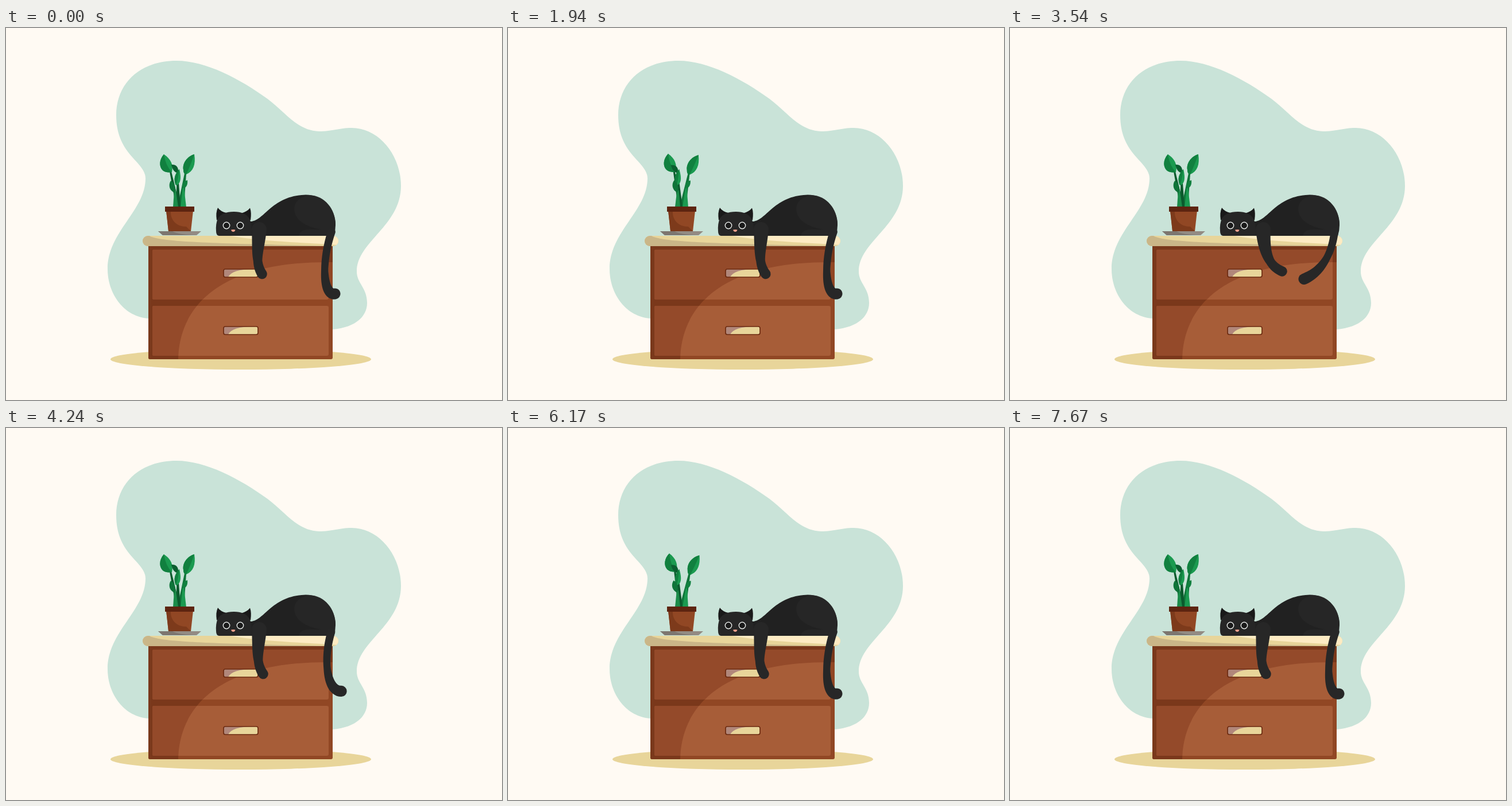
An HTML page that plays this animation: 864x648 px, repeating every 8 s.

```html
<!DOCTYPE html>
<html lang="en">
<head>
<meta charset="utf-8">
<title>Cat on a dresser</title>
<style>
  html, body { margin: 0; height: 100%; overflow: hidden; background: #fffaf3; }
  svg { display: block; width: 100%; height: 100%; }
</style>
</head>
<body>
<svg viewBox="0 0 864 648">
  <defs>
    <clipPath id="board"><rect x="238" y="362" width="341" height="18" rx="9"/></clipPath>
    <clipPath id="drawers">
      <rect x="255" y="386" width="307" height="87" rx="3"/>
      <rect x="255" y="484" width="307" height="87" rx="3"/>
    </clipPath>
    <path id="shade" d="M248 378H569V408C380 405 302 480 300 577H251Q248 577 248 574Z"/>
    <g id="handle">
      <rect x="379" y="420" width="60" height="14" rx="3" fill="#e8d59a"/>
      <path d="M379 420H436Q394 419 387 434H379Z" fill="#b1877b"/>
      <rect x="379" y="420" width="60" height="14" rx="3" fill="none" stroke="#6c2b11" stroke-width="1.7"/>
    </g>
  </defs>

  <path fill="#c9e3d8" d="M297 57C348 57 408 89 455 123C489 149 507 178 545 180C570 180 580 174 602 174C650 174 688 222 688 275C688 345 611 372 611 424C611 445 629 452 629 479C629 505 605 522 569 525L250 506C205 504 177 462 177 420C177 355 243 318 243 262C243 232 192 222 192 152C192 95 235 57 297 57Z"/>
  <ellipse cx="409" cy="577" rx="227" ry="18" fill="#e8d59a"/>

  <!-- dresser -->
  <rect x="248" y="374" width="321" height="203" rx="3" fill="#914724"/>
  <use href="#shade" fill="#7a381b"/>
  <g clip-path="url(#drawers)">
    <rect x="248" y="380" width="321" height="197" fill="#a75d38"/>
    <use href="#shade" fill="#944a2a"/>
  </g>
  <use href="#handle"/>
  <use href="#handle" y="100"/>
  <g clip-path="url(#board)">
    <rect x="238" y="362" width="341" height="18" fill="#e8d59a"/>
    <path d="M238 362H250C265 374 400 376 575 380H238Z" fill="#cab688"/>
    <path d="M390 362H579V378C520 374 450 372 390 362Z" fill="#fdebc3"/>
  </g>

  <!-- plant -->
  <g id="leftLeaf">
    <path d="M296 311L285 250L288 250L303 311Z" fill="#0b5a2d"/>
    <path d="M275 220C267 229 266 241 273 248C278 252 284 252 289 251C292 238 287 228 275 220Z" fill="#1b9a50"/>
    <path d="M275 220C267 229 266 241 273 248C278 252 284 252 289 251Q278 240 275 220Z" fill="#11803f"/>
  </g>
  <g id="rightLeaf">
    <path d="M299 311L311 253L314 254L310 311Z" fill="#0f7439"/>
    <path d="M328 220C315 224 307 236 309 247C309 252 311 255 314 255C326 250 331 238 328 220Z" fill="#1b9a50"/>
    <path d="M328 220C315 224 307 236 309 247C309 252 311 255 314 255Q321 240 328 220Z" fill="#11803f"/>
  </g>
  <g id="centreLeaf">
    <path d="M288 238C290 248 295 253 300 252C301 243 297 237 288 238Z" fill="#0b5f30"/>
    <path d="M296 311L298 250L301 270L304 311Z" fill="#0b5a2d"/>
    <path d="M302 246C294 254 291 264 296 274C304 272 306 262 302 246Z" fill="#1b9a50"/>
    <path d="M302 246C294 254 291 264 296 274Q300 262 302 246Z" fill="#11803f"/>
  </g>
  <g id="smallLeft">
    <path d="M291 312L293 283L296 283L300 312Z" fill="#1b8c49"/>
    <path d="M287 266C282 274 285 284 294 287C297 278 293 269 287 266Z" fill="#0f7439"/>
  </g>
  <g id="smallRight">
    <path d="M304 312L308 276L310 278L314 312Z" fill="#1b9a50"/>
    <path d="M316 265C309 267 306 272 308 279C314 279 317 273 316 265Z" fill="#11803f"/>
  </g>
  <path d="M279 318H326L322 354H283Z" fill="#914724"/>
  <path d="M279 318H287C286 334 296 346 314 346L322 354H283Z" fill="#7d3a1b"/>
  <rect x="277" y="311" width="51" height="9" fill="#5d2410"/>
  <path d="M265 354H340L332 361H273Z" fill="#938b83"/>
  <path d="M265 354H290Q300 360 330 361H273Z" fill="#7d766f"/>

  <!-- cat -->
  <path fill="#212121" d="M424 337C450 338 461 292 522 290.5C553 291 574 315 574 343Q574 353 571 362H425Z"/>
  <path fill="#262626" d="M528 291C555 292 574 315 574 343L571 352Q548 353 530 346C510 338 502 328 502 314Q503 297 528 291Z"/>
  <path fill="#262626" d="M510 362Q512 351 528 351H571V362Z"/>
  <path id="tail" fill="#272727"/>
  <path id="arm" fill="#272727"/>
  <path fill="#191919" d="M367 335Q365 321 369 313Q374 320 384 322ZM426 335Q428 321 425 313.5Q420 320 409 323Z"/>
  <path fill="#262626" d="M371 362Q366 361 366 354Q365 341 369 332Q376 320 397 320Q417 320 424 332Q429 341 428 362Z"/>
  <g fill="#1a1a1a" stroke="#e9ecea" stroke-width="1.4">
    <circle cx="384" cy="344" r="5.7"/>
    <circle cx="408" cy="344" r="5.7"/>
  </g>
  <path fill="#f1a08c" d="M392 351.5Q396 350.5 399.5 351.5Q398.5 355 396 355Q393 355 392 351.5Z"/>
</svg>

<script>
const LOOP = 8000;
const PLANT_PERIOD = 4330;
const $ = id => document.getElementById(id);
const clamp = u => Math.min(1, Math.max(0, u));
const mix = (a, b, u) => a + (b - a) * clamp(u);

// Smooth step from 0 to 1 between two times.
function ease(t, from, to) {
  const u = clamp((t - from) / (to - from));
  return u * u * (3 - 2 * u);
}

// One swing to each side that starts and ends softly.
function sway(t, angle, from, to) {
  const u = clamp((t - from) / (to - from));
  return angle * 1.3 * Math.sin(2 * Math.PI * u) * Math.sin(Math.PI * u);
}

// Outline of a round-ended limb along a cubic curve of four points.
function limb([a, b, c, d], radius) {
  const left = [], right = [], steps = 28;
  for (let i = 0; i <= steps; i++) {
    const u = i / steps, v = 1 - u, r = radius(u);
    const point = k => v*v*v*a[k] + 3*v*v*u*b[k] + 3*v*u*u*c[k] + u*u*u*d[k];
    const delta = k => v*v*(b[k] - a[k]) + 2*v*u*(c[k] - b[k]) + u*u*(d[k] - c[k]);
    const x = point(0), y = point(1), dx = delta(0), dy = delta(1);
    const scale = r / Math.hypot(dx, dy), nx = -dy * scale, ny = dx * scale;
    left.push(`${x + nx} ${y + ny}`);
    right.unshift(`${x - nx} ${y - ny}`);
  }
  const cap = (u, to) => `A${radius(u)} ${radius(u)} 0 0 0 ${to}`;
  return 'M' + left.join('L') + cap(1, right[0]) + 'L' + right.join('L') + cap(0, left[0]) + 'Z';
}

function drawPlant(t) {
  const turn = (id, angle) => $(id).setAttribute('transform', `rotate(${angle} 301 312)`);
  const right = sway(t, 4.3, 900, 3340);
  turn('leftLeaf', sway(t, -5.5, 60, 2260));
  turn('rightLeaf', right);
  turn('centreLeaf', sway(t, 3.3, 600, 2500));
  turn('smallLeft', sway(t, -3.7, 600, 2800));
  turn('smallRight', right * .9);
}

// The paw drifts left, swings right, comes back past its rest and settles.
function drawArm(t) {
  const d = -16 * ease(t, 870, 1250) + 48 * ease(t, 1300, 2800)
          - 41 * ease(t, 3250, 4750) + 9 * ease(t, 4950, 5750);
  const curve = [[441, 351], [440 + d * .08, 385], [433 + d * .55, 408 + d * .2],
                 [446 + d, 428.5 - d * d * .006]];
  const radius = u => u < .65 ? mix(13, 7.8, u / .65) : mix(7.8, 8.8, (u - .65) / .35);
  $('arm').setAttribute('d', limb(curve, radius));
}

// The tail swings like a pendulum that fades out, leaning right before it rests.
function drawTail(t) {
  const strength = ease(t, 2000, 2450) - ease(t, 3400, 4900);
  const lean = .14 * (ease(t, 4000, 4600) - ease(t, 4950, 5800));
  const swing = lean - strength * Math.cos(2 * Math.PI * (t - 2490) / 1030);
  const lift = strength * strength;
  const curve = [[567 - 2 * lift, 355], [550 + 12 * lift, 405 - 14 * lift],
                 [551 + 25 * swing + 18 * lift, 466 - 44 * lift],
                 [573 + 63 * swing, 463 - 27 * lift]];
  const radius = u => u < .45 ? mix(6.8, 6.2, u / .45) : mix(6.2, 9.6, (u - .45) / .5);
  $('tail').setAttribute('d', limb(curve, radius));
}

const start = performance.now();
function tick() {
  const t = (performance.now() - start) % LOOP;
  drawPlant(t % PLANT_PERIOD);
  drawArm(t);
  drawTail(t);
  requestAnimationFrame(tick);
}
tick();
</script>
</body>
</html>
```
